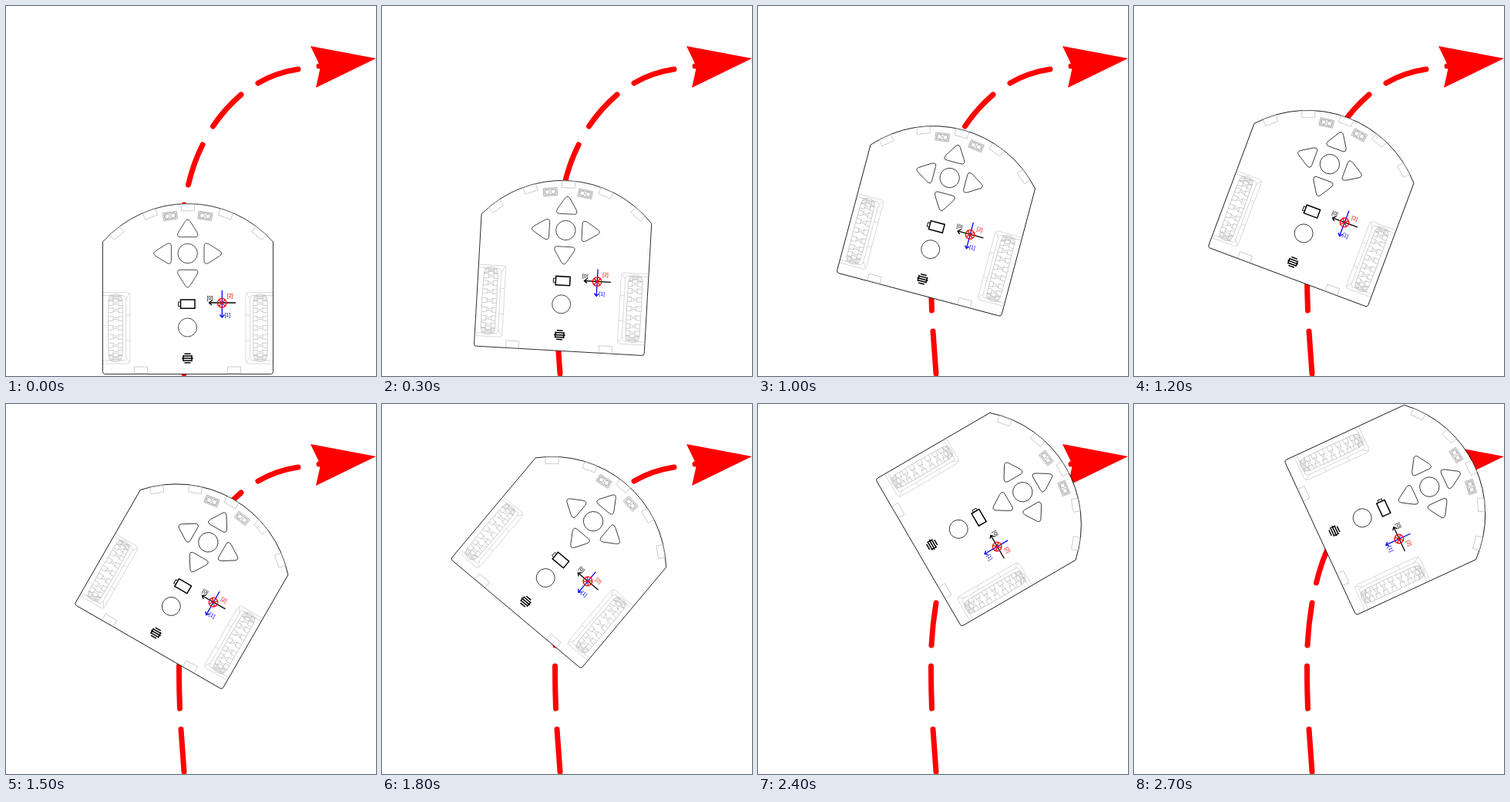
Write an HTML page that moves like this. It is 480 by 480 pixels and loops after 2.8 s.

```html
<!DOCTYPE html>
<html>
<head>
<meta charset="utf-8">
<style>
  html, body { margin: 0; width: 100%; height: 100%; overflow: hidden; background: #fff; }
  svg { display: block; width: 100vw; height: 100vh; }
  text { font: 7px "Liberation Sans", Arial, sans-serif; stroke: none; }
</style>
</head>
<body>
<svg viewBox="0 0 480 480" fill="none">
  <defs>
    <rect id="sensor" x="227.5" y="257" width="17" height="8.8"/>
    <path id="button" d="M239 279.5L247.8 293.5Q251 299.7 245 299.7H226.4Q220.4 299.7 223.6 293.5L232.4 279.5Q235.7 274.5 239 279.5Z"/>
    <g id="eyes">
      <rect x="-9" y="-5" width="18" height="10"/>
      <rect x="-7.5" y="-3.5" width="15" height="7"/>
      <circle cx="-3.8" r="3"/><circle cx="3.8" r="3"/>
    </g>
    <g id="wheel">
      <path stroke="#ccc" d="M126 371.5H157Q161 371.5 161 375.5V460Q161 464 157 464H126M126 375.5H152Q155.5 375.5 155.5 379V456.5Q155.5 460 152 460H126M155.5 380L160 373M155.5 455L160 462M155.5 401H161M155.5 434H161"/>
      <path d="M133 382Q134 373.5 142 373.5Q150 373.5 151 382Q152 417 151 453Q150 461.5 142 461.5Q134 461.5 133 453Q132 417 133 382Z"/>
      <path d="M134 379Q142 373 150 379M133.5 382Q142 376 150.5 382M134 456Q142 462 150 456M133.5 453Q142 459 150.5 453"/>
      <path id="tread"/>
    </g>
  </defs>

  <path stroke="#f00" stroke-width="7" stroke-linecap="round" d="M231 477Q229 450 227 422M225.5 395Q224.4 367 224.5 340M225 313Q226.5 285 231 258M236.5 232Q243 204 255 180M268.5 156Q284 133 305 115M327 100Q351 86 379 82M406 78h0"/>
  <path fill="#f00" d="M395 52L480 68L402 106L408 79Z"/>

  <g id="robot">
    <path fill="#fff" stroke="#000" stroke-width=".8" d="M125.5 306A148 148 0 0 1 346.5 306V474.5Q346.5 477.5 343.5 477.5H128.5Q125.5 477.5 125.5 474.5Z"/>
    <g id="grey" stroke="#bbb" stroke-width=".7">
      <use href="#sensor" x="-61" y="211"/>
      <use href="#sensor" x="60" y="211"/>
      <use href="#wheel"/>
      <use href="#wheel" transform="translate(472) scale(-1 1)"/>
      <g stroke="#999">
        <use href="#eyes" transform="translate(213 272.3) rotate(-8)"/>
        <use href="#eyes" transform="translate(258.3 272.3) rotate(8)"/>
      </g>
    </g>
    <g id="controls" stroke="#000" stroke-width=".7">
      <circle cx="235.7" cy="321" r="12.7"/>
      <circle cx="235.5" cy="417" r="12"/>
      <path stroke-width="1.5" d="M226.5 381H245V392.3H226.5Z"/>
      <path stroke-width=".9" d="M226 384H223.5V389.5H226"/>
      <path stroke-width="1.5" d="M231.5 451.2h8M229.3 454.1h12.4M228.3 457h14.4M229.3 459.9h12.4M231.5 462.8h8M230 453V461M241 453V461"/>
    </g>
    <g stroke-width="1.3">
      <path stroke="#000" d="M298 385H263.5M267 382L263.5 385L267 388"/>
      <path stroke="#00f" d="M280.3 369V404M277.3 400.5L280.3 404L283.3 400.5"/>
      <path stroke="#f00" d="M276 381L284.4 389.4M284.4 381L276 389.4"/>
      <circle stroke="#f00" cx="280.2" cy="385.2" r="5.8"/>
    </g>
    <text x="260.5" y="381" fill="#000">[0]</text>
    <text x="286.7" y="378" fill="#f00">[2]</text>
    <text x="283.4" y="403" fill="#00f">[1]</text>
  </g>
</svg>
<script>
const STEP = 100, LOOP = 2800;
const $ = id => document.getElementById(id);

// step, centre x, centre y, heading in degrees
const poses = [
  [0, 236, 367, 0], [6, 236.1, 307, 7], [10, 237.1, 267.5, 14.9],
  [15, 239.7, 219.4, 29.9], [17, 239.8, 198.7, 36.6], [18, 244.7, 187.6, 40],
  [20, 260.8, 169.7, 47], [24, 303.7, 137.6, 59.8], [27, 341.7, 127.2, 65.1]
];

const addUse = (parent, href, angle, cx, cy) =>
  $(parent).insertAdjacentHTML('beforeend', `<use href="#${href}" transform="rotate(${angle} ${cx} ${cy})"/>`);
for (let a = -40; a <= 40; a += 20) addUse('grey', 'sensor', a, 236, 404.6);
for (let a = 0; a < 360; a += 90) addUse('controls', 'button', a, 235.7, 321);

// Tyre lugs crowd together towards the ends as the tread curves away
let lugs = '';
for (let a = -64; a <= 64; a += 16) {
  const y = 417.5 + 43 * Math.sin(a * Math.PI / 180);
  lugs += `M133 ${y - 3}h6l2 2h3l2-2h5M133 ${y + 3}h5l2-2h4l2 2h5M139 ${y - 3}v6M146 ${y - 3}v6`;
}
$('tread').setAttribute('d', lugs);

const slope = (i, k) => {
  const a = poses[Math.max(i - 1, 0)], b = poses[Math.min(i + 1, poses.length - 1)];
  return (b[k] - a[k]) / (b[0] - a[0]);
};

function poseAt(step) {
  const i = Math.max(0, poses.findIndex(p => p[0] >= step) - 1);
  const a = poses[i], b = poses[i + 1], span = b[0] - a[0];
  const u = (step - a[0]) / span, v = 1 - u;
  return [1, 2, 3].map(k =>
    v * v * (1 + 2 * u) * a[k] + u * u * (3 - 2 * u) * b[k] +
    span * u * v * (v * slope(i, k) - u * slope(i + 1, k)));
}

function draw() {
  const [x, y, angle] = poseAt(Math.floor(performance.now() % LOOP / STEP));
  $('robot').setAttribute('transform', `translate(${x} ${y}) rotate(${angle}) translate(-236 -367)`);
  requestAnimationFrame(draw);
}
draw();
</script>
</body>
</html>
```
